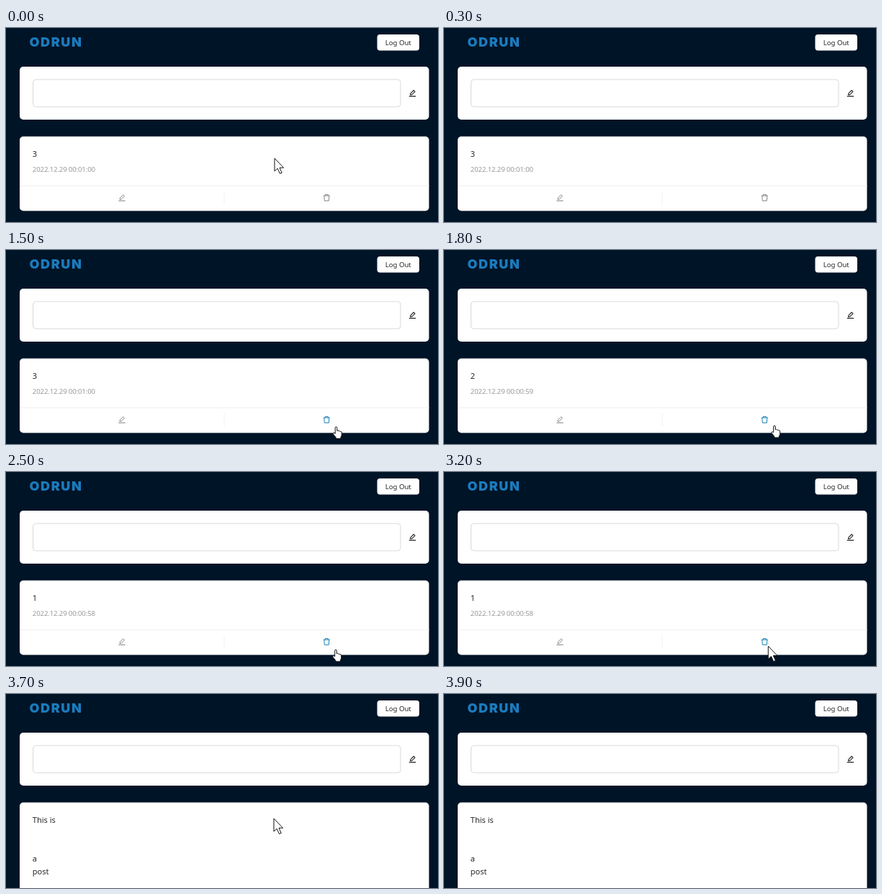
These frames come from a looping animation (600 px wide and 271 px high, 4300 ms). An HTML page:

```html
<!DOCTYPE html>
<html lang="en">
<head>
<meta charset="utf-8">
<title>Post list</title>
<style>
  html, body { margin: 0; width: 100%; height: 100%; overflow: hidden; background: #001427; }
  svg { display: block; width: 100%; height: 100%; }
  text { font-family: "Noto Sans", "Open Sans", sans-serif; fill: #262626; }
  .brand { font: 900 18px Inter, sans-serif; letter-spacing: 1.6px; fill: #1b7bbd; }
  .button { font-size: 9.6px; }
  .body { font-size: 11px; font-weight: 500; }
  .date { font-size: 9.7px; letter-spacing: -.18px; fill: #999; }
  .icon { fill: none; stroke: #858585; stroke-width: 1; stroke-linejoin: round; }
  .icon.dark { stroke: #262626; stroke-width: 1.1; }
  .icon.hover { stroke: #1b83b8; }
  .rule { stroke: #f0f0f0; }
  .pointer { fill: #fff; stroke: #111; stroke-width: 1; stroke-linejoin: round; }
</style>
</head>
<body>
<svg viewBox="0 0 600 271">
  <defs>
    <path id="pencil" d="M.3 9.4H9.7M2 7.5L2.4 5.3L6.7 1L8.5 2.8L4.2 7.1Z"/>
    <path id="bin" d="M.5 2.3H9.5M3 2.3V.6H7V2.3M1.5 2.3L2 9.4H8L8.5 2.3"/>
  </defs>
  <rect width="600" height="271" fill="#001427"/>

  <text class="brand" x="32.5" y="26.3">ODRUN</text>
  <rect x="515.5" y="9" width="58.5" height="22.5" rx="4" fill="#fff"/>
  <text class="button" x="526.7" y="23.7">Log Out</text>

  <rect x="19" y="54" width="568.5" height="74" rx="5" fill="#fff"/>
  <rect x="37.5" y="72" width="510.5" height="38" rx="4" fill="#fff" stroke="#d9d9e0"/>
  <use class="icon dark" href="#pencil" x="559.5" y="86"/>

  <rect id="card" x="19" y="151.5" width="568.5" height="104" rx="5" fill="#fff"/>
  <g id="short">
    <text id="title" class="body" x="36.8" y="180"></text>
    <text id="date" class="date" x="36.8" y="201.4"></text>
    <path class="rule" d="M19 220.5H587.5M303 229V246"/>
    <use class="icon" href="#pencil" x="156" y="232"/>
    <use id="remove" class="icon" href="#bin" x="440.3" y="232"/>
  </g>
  <g id="long" class="body">
    <text x="36.8" y="180">This is</text>
    <text x="36.8" y="233.5">a</text>
    <text x="36.8" y="251.5">post</text>
  </g>

  <path id="arrow" class="pointer" d="M0 0V18L4.2 14.2L7.4 21.4L10.2 20.2L7 13.2H12.6Z"/>
  <path id="hand" class="pointer" d="M-1.3 9.5V1.3Q-1.3 0 0 0T1.3 1.3V5.5Q2.7 4.6 3.6 5.9Q5 5.2 5.8 6.5Q7.5 6 7.7 8V11Q7.7 13 6.4 14.5V16.5H-.2V15L-3.8 10.5Q-4.6 9.2-3.6 8.5Q-2.6 8-1.3 9.5Z"/>
</svg>
<script>
  const LOOP = 4300;
  const $ = id => document.getElementById(id);

  // [start, pointer, x, y]
  const moves = [
    [0, "arrow", 373, 182],
    [100, "arrow", 385, 206],
    [200, "arrow", 398, 250],
    [300, ""],
    [1300, "arrow", 446, 260],
    [1400, "hand", 457, 250],
    [1500, "hand", 458.5, 247],
    [1600, "hand", 459, 245.5],
    [1900, "hand", 458.5, 247],
    [2000, "hand", 458, 248.3],
    [3200, "arrow", 450.3, 243.3],
    [3700, "arrow", 372, 174],
    [3800, "arrow", 203, 26],
    [3900, ""]
  ];

  // [start, title, date]; no title shows the long post
  const posts = [
    [0, "3", "2022.12.29 00:01:00"],
    [1700, "2", "2022.12.29 00:00:59"],
    [2500, "1", "2022.12.29 00:00:58"],
    [3300, ""]
  ];

  const stepAt = (steps, t) => steps.filter(s => s[0] <= t).pop();
  const show = (id, on) => $(id).setAttribute("visibility", on ? "visible" : "hidden");

  function draw(t) {
    const [, pointer, x, y] = stepAt(moves, t);
    for (const id of ["arrow", "hand"]) {
      show(id, id === pointer);
      if (id === pointer) $(id).setAttribute("transform", `translate(${x} ${y})`);
    }

    const [, title, date] = stepAt(posts, t);
    show("short", title);
    show("long", !title);
    $("card").setAttribute("height", title ? 104 : 140);
    $("title").textContent = title;
    $("date").textContent = date || "";
    $("remove").classList.toggle("hover", t >= 1400 && t < 3300);
  }

  const start = performance.now();
  function tick() {
    draw((performance.now() - start) % LOOP);
    requestAnimationFrame(tick);
  }
  tick();
</script>
</body>
</html>
```
